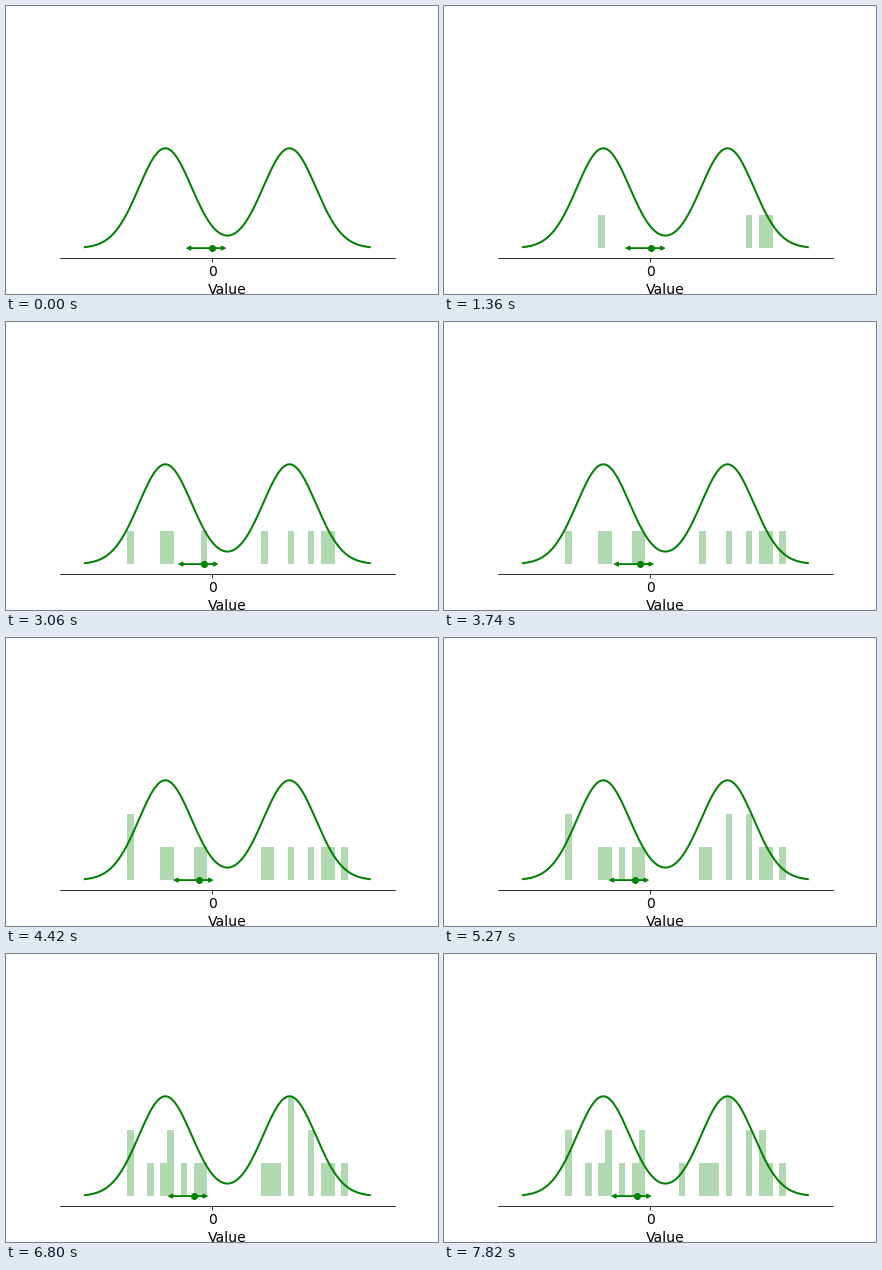
Write a matplotlib script that moves like this. It is 432 px wide and 288 px high and loops after 7990 ms.

```python
import numpy as np
import matplotlib.pyplot as plt
from matplotlib.animation import FuncAnimation

LOW, HIGH, BINS = -5, 6, 50
WIDTH = (HIGH - LOW) / BINS
TAU, RATE = 0.3, 0.2
FRAMES, STEP_MS = 47, 170

# Histogram bin hit by each successive sample
draws = [40, 15, 39, 37, 16, 34, 10, 30, 21, 42, 20, 31,
         10, 18, 34, 37, 16, 32, 13, 34, 27, 39, 21]


def center(b):
    return LOW + WIDTH * (b + 0.5)


def estimate(n):
    """Quantile estimate after n samples, with asymmetric steps."""
    v = 0.0
    for b in draws[:n]:
        v += RATE * (TAU if center(b) > v else TAU - 1)
    return v


def density(x):
    return sum(np.exp(-0.5 * ((x - m) / 0.867) ** 2) for m in (-1.54, 2.54))


fig, ax = plt.subplots(figsize=(6, 4), dpi=72)
fig.subplots_adjust(left=0.125, right=0.9, bottom=0.125, top=0.88)
ax.set_xlim(LOW, HIGH)
ax.set_ylim(-0.3, 6.3)
ax.spines[["left", "right", "top"]].set_visible(False)
ax.set_yticks([])
ax.set_xticks([0], ["0"], fontsize=14)
ax.set_xlabel("Value", fontsize=14)

xs = np.linspace(0.5 - 4.68, 0.5 + 4.68, 300)
ax.plot(xs, 3.03 * density(xs), color="green", lw=2)
bars = ax.bar(center(np.arange(BINS)), np.zeros(BINS), WIDTH,
              color="green", alpha=0.3, lw=0)
dot, = ax.plot([0], [0], "o", color="green", ms=6)
arrows = [ax.arrow(0, 0, dx, 0, width=0.02, head_width=0.125,
                   head_length=0.14, color="green", lw=1, zorder=2)
          for dx in (TAU, TAU - 1)]


def update(i):
    # A sample lands on odd steps; the estimate reacts on the next one.
    counts = np.bincount(draws[:(i + 1) // 2], minlength=BINS) if i else np.zeros(BINS)
    for bar, n in zip(bars, counts):
        bar.set_height(n)
    v = estimate(i // 2)
    dot.set_xdata([v])
    for arrow in arrows:
        arrow.set_data(x=v)
    return [*bars, dot, *arrows]


anim = FuncAnimation(fig, update, frames=FRAMES, interval=STEP_MS,
                     init_func=lambda: update(0), repeat=True, repeat_delay=0)
plt.show()
```
